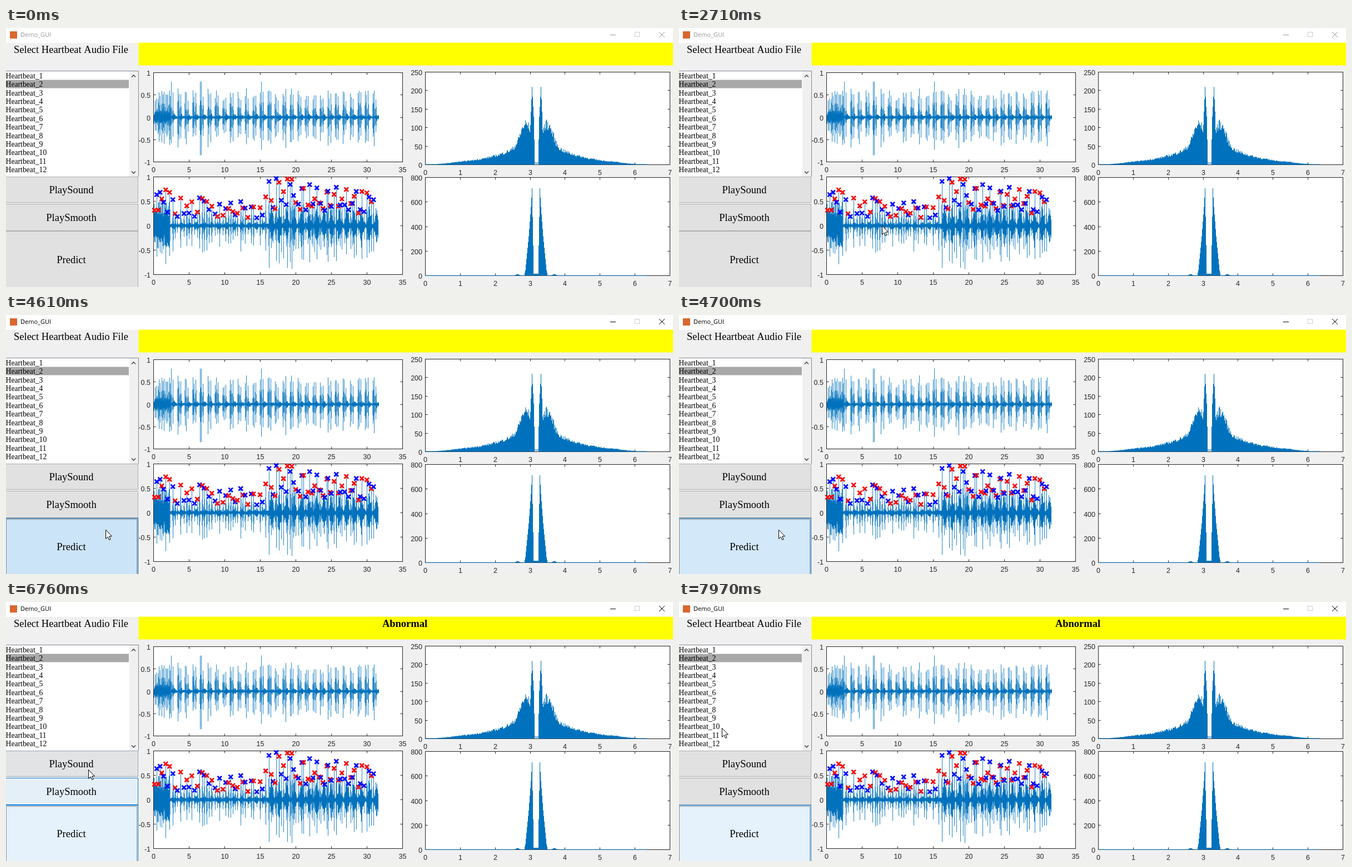
An HTML page with a canvas that plays this animation: 1200 px wide and 467 px high, repeating every 8 s.

```html
<!DOCTYPE html>
<html>
<head>
<meta charset="utf-8">
<style>
html, body { margin: 0; width: 100%; height: 100%; overflow: hidden; background: #f0f0f0; }
canvas { display: block; }
</style>
</head>
<body>
<canvas id="stage" width="1200" height="467"></canvas>
<script>
const LOOP = 8000, BLUE = '#0072bd';
const SERIF = '"Liberation Serif", serif', SANS = '"Liberation Sans", sans-serif';
const screen = document.getElementById('stage').getContext('2d');
const base = document.createElement('canvas');
base.width = 1200;
base.height = 467;
let g = base.getContext('2d');

let seed = 7;
const rnd = (a = 0, b = 1) => {
  seed = (seed * 16807) % 2147483647;
  return a + (b - a) * seed / 2147483647;
};

function rect(x, y, w, h, color) {
  g.fillStyle = color;
  g.fillRect(x, y, w, h);
}
function frame(x, y, w, h, color) {
  g.strokeStyle = color;
  g.lineWidth = 1;
  g.strokeRect(x, y, w, h);
}
function line(points, color, width = 1) {
  g.strokeStyle = color;
  g.lineWidth = width;
  g.beginPath();
  for (let i = 0; i < points.length; i += 2) g.lineTo(points[i], points[i + 1]);
  g.stroke();
}
function text(s, x, y, font, align = 'center', color = '#000') {
  g.font = font;
  g.textAlign = align;
  g.fillStyle = color;
  g.fillText(s, x, y);
}
// Value at x on a polyline of x, y pairs
function curve(p, x) {
  for (let i = 2; i < p.length; i += 2) {
    if (x <= p[i]) {
      const k = (x - p[i - 2]) / (p[i] - p[i - 2]);
      return p[i - 1] + k * (p[i + 1] - p[i - 1]);
    }
  }
  return p[p.length - 1];
}

const plots = {
  raw:      { x: 265, y: 80, w: 448, h: 161, xMax: 35, xStep: 5, lo: -1, hi: 1, yStep: .5 },
  peaks:    { x: 265, y: 268, w: 448, h: 176, xMax: 35, xStep: 5, lo: -1, hi: 1, yStep: .5 },
  spectrum: { x: 754, y: 79, w: 440, h: 167, xMax: 7, xStep: 1, lo: 0, hi: 250, yStep: 50 },
  smooth:   { x: 754, y: 269, w: 440, h: 177, xMax: 7, xStep: 1, lo: 0, hi: 800, yStep: 200 }
};
const toY = (p, v) => p.y + .5 + p.h * (p.hi - v) / (p.hi - p.lo);

function axes(p) {
  const ink = '#262626', font = '12.5px ' + SANS;
  const x = p.x + .5, y = p.y + .5, r = x + p.w, b = y + p.h;
  rect(p.x, p.y, p.w, p.h, '#fff');
  frame(x, y, p.w, p.h, ink);
  for (let v = 0; v <= p.xMax; v += p.xStep) {
    const tx = Math.round(p.x + p.w * v / p.xMax) + .5;
    line([tx, y, tx, y + 4], ink);
    line([tx, b, tx, b - 4], ink);
    text(v, tx, b + 18, font, 'center', ink);
  }
  for (let v = p.lo; v <= p.hi; v += p.yStep) {
    const ty = Math.round(toY(p, v) - .5) + .5;
    line([x, ty, x + 4, ty], ink);
    line([r, ty, r - 4, ty], ink);
    text(v, x - 5.5, ty + 5, font, 'right', ink);
  }
}

function bar(p, x, top, bottom) {
  const y = toY(p, top);
  g.fillRect(x, y, 1, Math.max(1, toY(p, bottom) - y));
}
function noise(p, end, level) {
  g.fillStyle = BLUE;
  for (let x = p.x + 1; x < end; x++) {
    const a = level(x);
    bar(p, x, a * rnd(.4, 1.1), -a * rnd(.4, 1.1));
  }
}
function spike(p, x, up, down) {
  g.fillStyle = BLUE;
  for (let k = -1; k <= 1; k++) {
    const a = k ? rnd(.25, .6) : 1;
    g.globalAlpha = k ? .6 : .85;
    bar(p, x + k, up * a, -down * a);
  }
  g.globalAlpha = 1;
}

const BEAT = 13.5, FIRST = 275, LAST = 671;
const pulse = x => Math.abs(Math.cos(Math.PI * (x - FIRST) / BEAT)) ** 4;

function drawRaw() {
  const p = plots.raw;
  noise(p, LAST, x => x < 295 ? .14 : .03 + .05 * pulse(x));
  for (let x = FIRST - BEAT / 2; x < LAST; x += x < 295 ? BEAT / 2 : BEAT) {
    for (const gap of [0, 2, 5]) {
      const up = rnd() < .04 ? .8 : rnd(.36, .65);
      spike(p, Math.round(x + gap), up, up * rnd(.7, 1.1));
    }
  }
}

// Each mark sits on a spike; the loud parts are at the start and after x = 468
function drawPeaks() {
  const p = plots.peaks;
  const loud = x => x < 294 || x > 468;
  const height = [266, 1, 292, .9, 300, .55, 370, .62, 465, .4, 470, .98, 610, .95, 662, .6];
  const marks = [];
  for (let x = 267; x < 663; x += loud(x) ? rnd(2.4, 4.8) : rnd(3.2, 6.2)) {
    marks.push([Math.round(x), curve(height, x) * rnd(.3, 1)]);
  }
  noise(p, LAST - 1, x => x < 294 ? .45 : loud(x) ? .07 + .35 * pulse(x) : .04 + .05 * pulse(x));
  for (const [x, v] of marks) spike(p, x, v, v * rnd(.75, 1.1));
  marks.forEach(([x, v], i) => {
    const y = toY(p, v), color = i % 2 ? '#00f' : '#f00';
    line([x - 3.5, y - 4, x + 4, y + 3.5], color, 2.7);
    line([x - 3.5, y + 3.5, x + 4, y - 4], color, 2.7);
  });
}

const bell = (d, center, width) => Math.exp(-(((d - center) / width) ** 2));

function drawSpectra() {
  const notch = [0, 5, 3, 6, 5, 130, 8, 210, 11, 110];
  const lobe = [0, 15, 4, 15, 7, 712, 9, 560, 13, 320, 19, 45, 21, 3];
  g.fillStyle = BLUE;
  for (let x = 755; x < 1153; x++) {
    const d = Math.abs(x - 954), e = Math.abs(x - 953);
    const tail = (95 * Math.exp(-d / 58) + 52 * bell(d, 21, 12)) * Math.min(1, (205 - d) / 60);
    const top = d < 11 ? curve(notch, d) : tail * rnd(.78, 1.04);
    bar(plots.spectrum, x, Math.max(top, 1.5), d < 4 ? top - 2 : 0);
    bar(plots.smooth, x, curve(lobe, e) + 10 * bell(e, 33, 3), 0);
  }
}

function drawBase() {
  rect(0, 0, 1200, 467, '#f0f0f0');
  rect(0, 0, 1200, 27, '#fff');
  rect(7, 6, 13, 13, '#d9672e');
  rect(238.5, 26.5, 961.5, 41, '#ff0');
  text('Select Heartbeat Audio File', 117, 45, '18.5px ' + SERIF);

  rect(0, 77, 238, 191, '#fff');
  line([0, 77.5, 238.5, 77.5, 238.5, 268], '#828790');
  rect(222, 78, 16, 190, '#f0f0f0');
  line([226, 88.5, 229.5, 85, 233, 88.5], '#505050', 1.6);
  line([226, 258.5, 229.5, 262, 233, 258.5], '#505050', 1.6);
  rect(0, 93.5, 221, 15, '#a9a9a9');
  for (let i = 0; i < 12; i++) {
    text('Heartbeat_' + (i + 1), -.5, 90.8 + i * 15.4, '13.7px ' + SERIF, 'left');
  }

  Object.values(plots).forEach(axes);
  drawRaw();
  drawPeaks();
  drawSpectra();
}

const ramp = (t, a, b) => Math.min(1, Math.max(0, (t - a) / (b - a)));
const mix = (a, b, k) => a.map((v, i) => v + (b[i] - v) * k);
const rgb = c => `rgb(${c.map(Math.round)})`;

// Fill and border colours of each button state
const IDLE = [225, 225, 225], HOVER = [229, 241, 251], PRESSED = [204, 228, 247];
const EDGE = [173, 173, 173], HOVER_EDGE = [0, 120, 215], PRESSED_EDGE = [0, 84, 153];

function button(label, y, h, hover, press = 0, focused = false) {
  const edge = rgb(mix(mix(EDGE, HOVER_EDGE, hover), PRESSED_EDGE, press));
  rect(0, y, 238, h, rgb(mix(mix(IDLE, HOVER, hover), PRESSED, press)));
  frame(-.5, y + .5, 238, h - 1, edge);
  if (focused) {
    g.setLineDash([1, 1]);
    frame(.5, y + 2.5, 235, h, '#333');
    g.setLineDash([]);
  }
  text(label, 117.5, y + h / 2 + 6, '18.5px ' + SERIF);
}

// Pointer moves: first step, last step, final x, final y
const STEP = 108;
const moves = [
  [960, 1070, 776, 436], [1410, 1840, 531, 370], [1950, 2160, 419, 353],
  [2520, 2710, 365, 356], [2820, 3270, 230, 372], [3390, 3480, 193, 380],
  [3620, 3700, 184, 383], [3840, 4060, 179, 387], [5930, 6010, 179, 367],
  [6160, 6350, 172, 346], [6560, 6760, 148, 302], [6870, 7320, 105, 249],
  [7450, 7970, 77, 227]
];

function pointerAt(t) {
  let x = 818, y = 450;
  for (const [start, end, toX, toY] of moves) {
    if (t < start) break;
    const gaps = Math.round((end - start) / STEP);
    const done = (1 + Math.floor(ramp(t, start, end) * gaps)) / (gaps + 1);
    x += (toX - x) * done;
    y += (toY - y) * done;
  }
  return [Math.round(x), Math.round(y)];
}

const arrow = new Path2D('M0 0V16L3.7 12.5L6.2 18L8.6 17L6.2 11.5H11Z');
function pointer(x, y) {
  g.save();
  g.translate(x + .5, y + .5);
  g.fillStyle = '#fff';
  g.fill(arrow);
  g.strokeStyle = '#000';
  g.lineWidth = 1;
  g.stroke(arrow);
  g.restore();
}

function windowControls(active) {
  const ink = active ? '#000' : '#999';
  text('Demo_GUI', 26, 16, '11px "Open Sans", sans-serif', 'left', ink);
  line([1087, 12.5, 1097, 12.5], ink);
  frame(1131.5, 7.5, 8, 8, '#ccc');
  line([1175, 7, 1185, 17], ink);
  line([1175, 17, 1185, 7], ink);
}

function draw(t) {
  g.drawImage(base, 0, 0);
  const clicked = t >= 4490, predicted = t >= 4810;
  windowControls(clicked);
  if (predicted) text('Abnormal', 717.5, 45, 'bold 18.5px ' + SERIF);

  const press = predicted ? 0 : ramp(t, 4440, 4600) - ramp(t, 4620, 4900);
  button('PlaySound', 268, 47, ramp(t, 6735, 6960) - ramp(t, 7150, 7320));
  button('PlaySmooth', 317, 49, ramp(t, 6120, 6350) - ramp(t, 6730, 6980));
  button('Predict', 366, 103, ramp(t, 3230, 3480), clicked ? press : 0, clicked);

  if (t >= 960) pointer(...pointerAt(t));
}

drawBase();
g = screen;
const begin = performance.now();
function tick() {
  draw((performance.now() - begin) % LOOP);
  requestAnimationFrame(tick);
}
tick();
</script>
</body>
</html>
```
